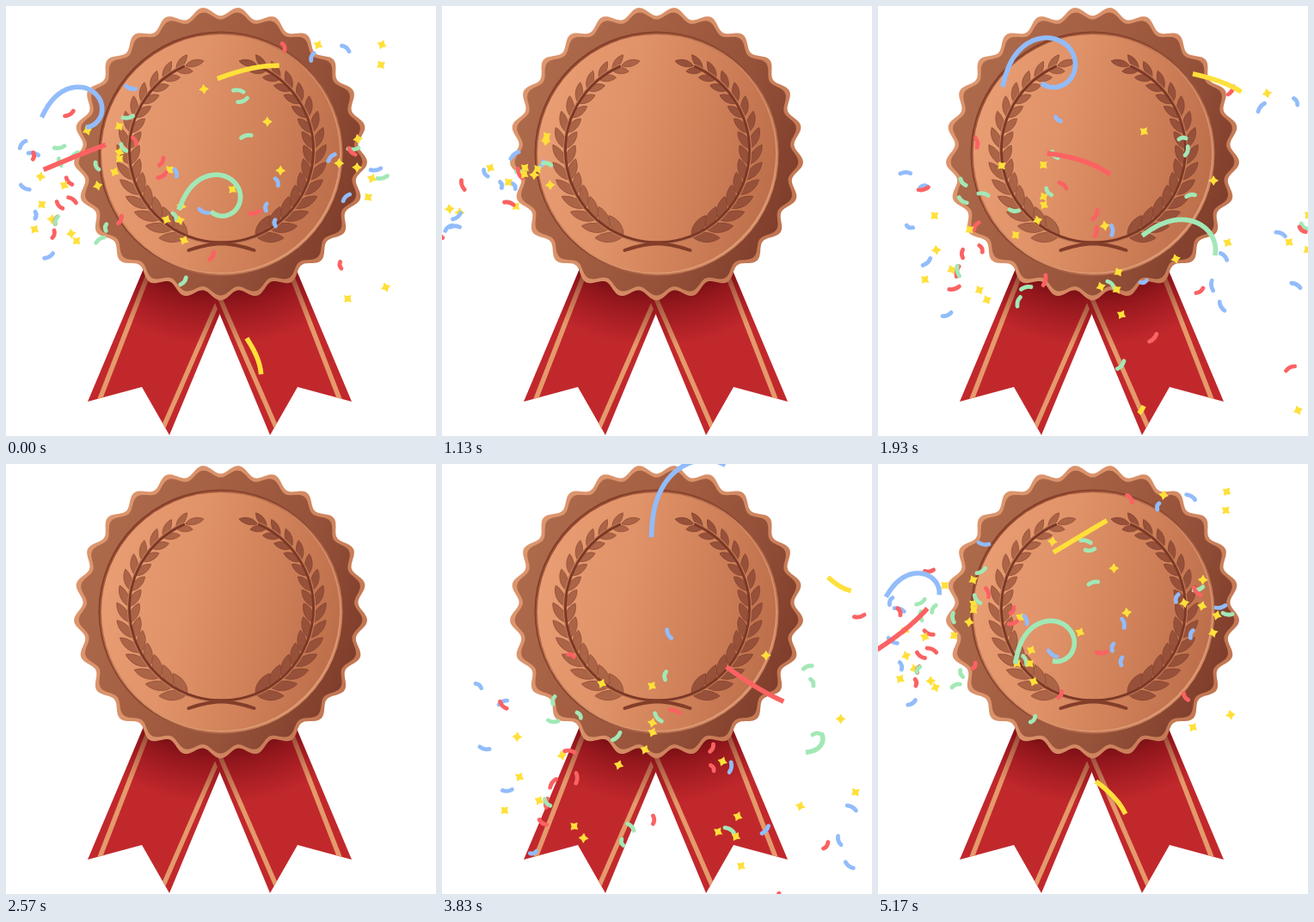
An HTML page with a canvas that plays this animation: 500 by 500 pixels, repeating every 5210 ms.

```html
<!DOCTYPE html>
<html lang="en">
<head>
<meta charset="utf-8">
<title>Bronze award</title>
<style>
html, body { margin: 0; width: 100%; height: 100%; overflow: hidden; background: #fff; }
canvas { display: block; width: 500px; height: 500px; }
</style>
</head>
<body>
<canvas id="stage" width="500" height="500"></canvas>
<script>
const LOOP = 5210, STEP = 62.5, GRAVITY = 2.65, PIECES = 80;
const BURSTS = [0, 1749, 3495, 5232];   // when each burst is at step 0
const YELLOW = '#ffe03a', RED = '#fb6262', BLUE = '#92bcfb', GREEN = '#a2e8b6';
const TAU = Math.PI * 2, CX = 249.5, CY = 171.5;

const stage = document.getElementById('stage');
const ctx = stage.getContext('2d');

function seeded(seed) {
  return () => {
    seed = (seed * 1664525 + 1013904223) % 4294967296;
    return seed / 4294967296;
  };
}

/* ---- medal ---- */

function polygon(c, pts) {
  c.beginPath();
  pts.forEach(([x, y]) => c.lineTo(x, y));
  c.closePath();
}
function line(c, [x0, y0, x1, y1], width, color) {
  c.beginPath();
  c.moveTo(x0, y0);
  c.lineTo(x1, y1);
  c.lineWidth = width;
  c.strokeStyle = color;
  c.stroke();
}
function blend(c, x0, y0, x1, y1, colors) {
  const g = c.createLinearGradient(x0, y0, x1, y1);
  colors.forEach((col, i) => g.addColorStop(i / (colors.length - 1), col));
  return g;
}
function disc(c, r, ...fill) {
  c.beginPath();
  c.arc(CX, CY, r, 0, TAU);
  c.fillStyle = blend(c, ...fill);
  c.fill();
}
function scallop(c, r, depth, colors) {
  c.beginPath();
  for (let i = 0; i < 1000; i++) {
    const a = i / 1000 * TAU, d = r + depth * Math.cos(25 * a);
    c.lineTo(CX + d * Math.sin(a), CY + d * Math.cos(a));
  }
  c.closePath();
  c.fillStyle = blend(c, 90, 100, 410, 240, colors);
  c.fill();
}

function mirrored(c, axis, draw) {
  for (const side of [1, -1]) {
    c.save();
    c.translate(axis, 0);
    c.scale(side, 1);
    draw(side);
    c.restore();
  }
}

// Left tail; x is measured from the medal's axis
function ribbon(c) {
  polygon(c, [[-82, 290], [-153.5, 460], [-90.5, 443], [-58.5, 499], [.5, 357], [20, 311]]);
  c.fillStyle = '#c1282c';
  c.fill();
  c.save();
  c.clip();
  line(c, [-80, 304, -140.5, 460], 5.5, '#e59a6c');
  line(c, [8, 321, -66, 491], 5.5, '#e59a6c');
  const shade = c.createRadialGradient(0, CY, 150, 0, CY, 225);
  shade.addColorStop(0, 'rgba(70,0,5,.7)');
  shade.addColorStop(.35, 'rgba(85,0,8,.42)');
  shade.addColorStop(1, 'rgba(100,0,8,0)');
  c.fillStyle = shade;
  c.fillRect(-250, 280, 500, 220);
  c.restore();
}

function leaf(c, x, y, angle, len, width) {
  c.save();
  c.translate(x, y);
  c.rotate(angle);
  c.beginPath();
  c.moveTo(0, 0);
  c.bezierCurveTo(len * .3, -width, len * .75, -width * .8, len, 0);
  c.bezierCurveTo(len * .75, width * .65, len * .3, width * .85, 0, 0);
  c.fill();
  c.stroke();
  c.restore();
}

// Left half of the laurel around its own centre
function branch(c, side) {
  const R = 107, at = a => [-R * Math.sin(a), R * Math.cos(a)];
  c.fillStyle = side > 0 ? '#ab6446' : '#97513a';
  c.strokeStyle = side > 0 ? '#955038' : '#86442f';
  c.lineWidth = .8;
  for (let i = 0; i < 14; i++) {
    const a = .38 + i * .173, size = 1 - i * .026;
    leaf(c, ...at(a), a + Math.PI - .45, 33 * size, 9 * size);
    leaf(c, ...at(a), a + Math.PI + .58, 29 * size, 9 * size);
  }
  leaf(c, ...at(2.74), -.25, 22, 6);
  c.lineCap = 'round';
  for (const [r, color] of [[R + 1.2, '#c17a56'], [R, '#7c3826']]) {
    c.beginPath();
    c.arc(0, 0, r, Math.PI / 2 - .1, Math.PI / 2 + 2.72);
    c.lineWidth = 2.8;
    c.strokeStyle = color;
    c.stroke();
  }
  c.beginPath();
  c.moveTo(-38, 116);
  c.quadraticCurveTo(-14, 107, 12, 108);
  c.lineWidth = 4;
  c.strokeStyle = '#833e2a';
  c.stroke();
}

function makeMedal() {
  const layer = document.createElement('canvas');
  layer.width = layer.height = 500;
  const c = layer.getContext('2d');
  mirrored(c, 248.5, () => ribbon(c));
  scallop(c, 165.5, 5.2, ['#dd966e', '#d88f68', '#c07450']);
  scallop(c, 160.5, 4.6, ['#ae6b4c', '#a56043', '#96523a', '#7d3c2a']);
  disc(c, 142, 130, 80, 370, 270, ['#7f3c28', '#8d4630', '#d99068']);
  disc(c, 140.3, 150, 60, 350, 290, ['#95492f', '#d18a62', '#e3a078']);
  disc(c, 138.6, 115, 145, 385, 205, ['#e99d73', '#e09268', '#d08159', '#bd6f4b']);
  c.translate(0, 168);
  mirrored(c, 250.5, side => branch(c, side));
  return layer;
}

/* ---- confetti ---- */

// Pieces further across fly faster; lower ones are already falling
function makePieces() {
  const rnd = seeded(73);
  return Array.from({ length: PIECES }, (_, i) => {
    const x = 15 + 430 * Math.pow(rnd(), 1.4);
    const y = 200 + (rnd() + rnd() - 1) * (75 + .35 * x);
    return {
      x, y,
      vx: 33 * (1 - Math.exp(-x / 130)),
      vy: -10 + .08 * y + .05 * x,
      angle: rnd() * TAU,
      spin: (rnd() - .5) * .9,
      color: [YELLOW, RED, YELLOW, GREEN, BLUE][i % 5]
    };
  });
}

function drawPiece(p, n) {
  ctx.save();
  ctx.translate(p.x + p.vx * n, p.y + p.vy * n + GRAVITY * n * n);
  ctx.rotate(p.angle + p.spin * n);
  ctx.beginPath();
  if (p.color === YELLOW) {
    for (let i = 0; i < 8; i++) {
      const r = i % 2 ? 3.2 : 6, a = i * TAU / 8;
      ctx.lineTo(r * Math.cos(a), r * Math.sin(a));
    }
    ctx.fillStyle = YELLOW;
    ctx.fill();
  } else {
    const half = 3.6 + 2.4 * Math.abs(Math.cos(p.angle + n * .4));
    ctx.moveTo(-half, 1);
    ctx.quadraticCurveTo(0, -2, half, .5);
    ctx.lineCap = 'round';
    ctx.lineWidth = 4.8;
    ctx.strokeStyle = p.color;
    ctx.stroke();
  }
  ctx.restore();
}

// pos, vel and acc move the middle; len and bend are [peak, rate, step of peak] of a
// cosine; turn is [start angle, spin]
const streamers = [
  { color: BLUE, pos: [76, 118], vel: [37, -22], acc: [.4, 1.4],
    len: [190, .28, 2.9], bend: [5.5, .35, 2], turn: [-1.1, -.08] },
  { color: RED, pos: [79, 176], vel: [53, -12], acc: [0, 5],
    len: [78, 0, 0], bend: [.5, .65, 2.3], turn: [-.4, .19] },
  { color: YELLOW, pos: [281, 77], vel: [45, -4.5], acc: [-2.1, 3],
    len: [74, .21, 0], bend: [.6, .65, 1.4], turn: [-.35, .2] },
  { color: YELLOW, pos: [288, 407], vel: [15, 20], acc: [-3, .5],
    len: [54, .28, -2], bend: [.5, .3, 0], turn: [1, .35] },
  { color: GREEN, pos: [236, 220], vel: [42, 14], acc: [-1, 1],
    len: [155, .25, 0], bend: [5.2, .37, 0], turn: [-1.2, .2] }
];

function drawStreamer({ color, pos, vel, acc, len, bend, turn }, n) {
  const wave = ([peak, rate, top]) => peak * Math.cos(rate * (n - top));
  const [midX, midY] = pos.map((p, k) => p + vel[k] * n + acc[k] * n * n);
  const parts = 40, unit = Math.abs(wave(len)) / parts, curl = wave(bend);
  const xs = [0], ys = [0];
  for (let i = 0; i < parts; i++) {
    const a = turn[0] + turn[1] * n + curl * Math.pow(i / parts, 1.6);
    xs.push(xs[i] + unit * Math.cos(a));
    ys.push(ys[i] + unit * Math.sin(a));
  }
  const middle = v => (Math.min(...v) + Math.max(...v)) / 2;
  const dx = midX - middle(xs), dy = midY - middle(ys);
  ctx.beginPath();
  xs.forEach((x, i) => ctx.lineTo(x + dx, ys[i] + dy));
  ctx.lineCap = 'butt';
  ctx.lineJoin = 'round';
  ctx.lineWidth = 5.6;
  ctx.strokeStyle = color;
  ctx.stroke();
}

/* ---- playback ---- */

const medal = makeMedal(), pieces = makePieces();

function render(t) {
  ctx.fillStyle = '#fff';
  ctx.fillRect(0, 0, 500, 500);
  ctx.drawImage(medal, 0, 0);
  const n = (t - BURSTS.find(b => t - b < 13.1 * STEP)) / STEP;
  if (n < -12.8) return;
  pieces.forEach(p => drawPiece(p, n));
  streamers.forEach(s => drawStreamer(s, n));
}

const begin = performance.now();
function tick() {
  render((performance.now() - begin) % LOOP);
  requestAnimationFrame(tick);
}
tick();
</script>
</body>
</html>
```
